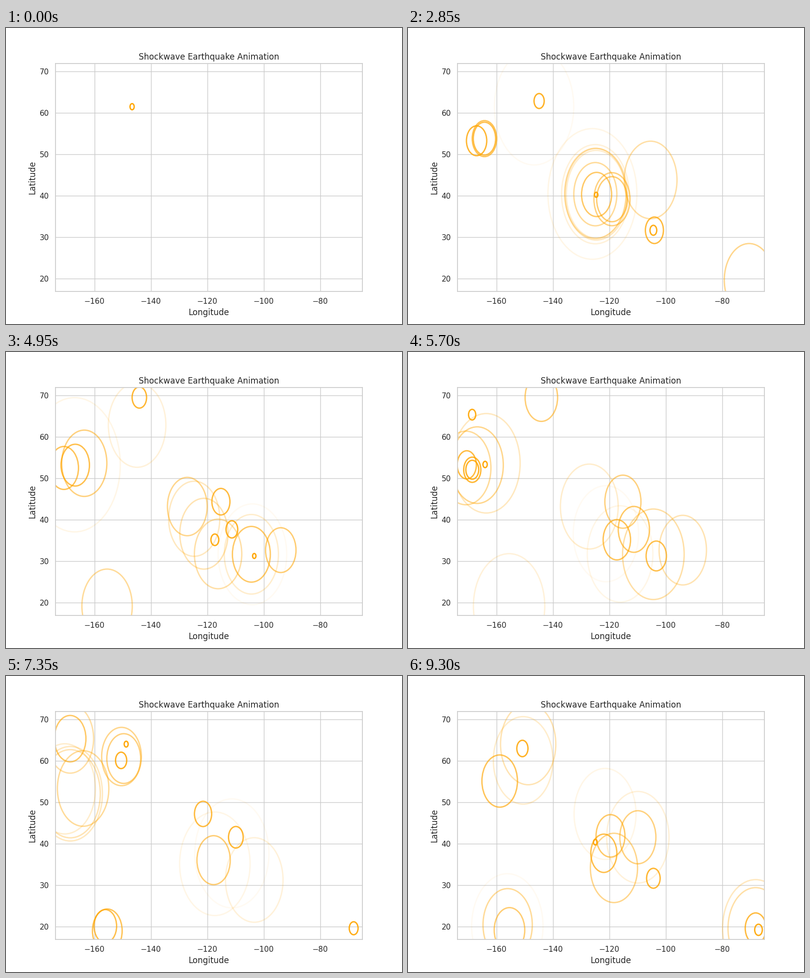
Write a matplotlib script that moves like this. It is 800 px wide and 600 px high and loops after 9.45 s.

```python
import matplotlib.pyplot as plt
from matplotlib.animation import FuncAnimation
from matplotlib.patches import Circle

LIFE = 20        # frames until a ring has faded out
SPEED = 0.2      # degrees per frame and unit of magnitude
INTERVAL = 150

# Epicentres as (longitude, latitude)
SITES = dict(
    # far north
    n1=(-146.66, 61.5), n2=(-144.88, 62.87), n3=(-144.09, 69.51),
    n4=(-168.63, 65.37), n5=(-150.41, 61.06), n6=(-149.62, 60.57),
    n7=(-150.55, 60.13), n8=(-148.76, 64.05), n9=(-150.81, 63.0),
    # island arc
    a1=(-164.26, 53.8), a2=(-167.05, 53.28), a3=(-163.61, 53.64),
    a4=(-170.85, 52.51), a5=(-166.82, 53.19), a6=(-170.53, 53.26),
    a7=(-168.58, 52.08), a8=(-164.03, 53.35), a9=(-158.86, 55.14),
    # west coast
    w1=(-125.98, 40.45), w2=(-124.95, 40.39), w3=(-124.64, 40.37),
    w4=(-124.92, 40.58), w5=(-121.2, 36.64), w6=(-127.09, 43.2),
    w7=(-121.5, 47.21), w8=(-121.94, 37.71), w9=(-124.5, 40.32),
    w10=(-124.64, 40.25),
    # inland
    i1=(-105.35, 43.82), i2=(-119.04, 39.18), i3=(-115.17, 44.37),
    i4=(-111.28, 37.69), i5=(-117.32, 35.18), i6=(-117.76, 36.05),
    i7=(-109.87, 41.58), i8=(-118.34, 34.18), i9=(-119.57, 41.91),
    # south
    s1=(-104.0, 31.68), s2=(-104.37, 31.68), s3=(-116.17, 31.76),
    s4=(-93.94, 32.68), s5=(-103.34, 31.27),
    # mid-ocean
    o1=(-155.53, 19.18), o2=(-155.45, 19.0), o3=(-156.15, 20.13),
    o4=(-156.04, 20.45), o5=(-155.39, 19.18),
    # south-east
    e1=(-70.42, 19.68), e2=(-68.1, 19.62), e3=(-67.09, 19.24),
)

# One quake starts per frame: (site, magnitude)
QUAKES = [
    ("n1", 3.7), ("n1", 3.7), ("w1", 4.38), ("w2", 3.52), ("w3", 3.31),
    ("w3", 3.68), ("w4", 3.89), ("i1", 3.6), ("w2", 3.18), ("e1", 4.0),
    ("i2", 3.2), ("i2", 3.02), ("w9", 3.33), ("a1", 3.1), ("a1", 3.3),
    ("s1", 3.2), ("a2", 4.5), ("n2", 3.0), ("s2", 3.0), ("w10", 3.02),
    ("w5", 3.05), ("s3", 3.23), ("o1", 3.72), ("w6", 3.2), ("a3", 4.0),
    ("s4", 3.0), ("s2", 4.2), ("a4", 3.7), ("a5", 4.2), ("i3", 3.2),
    ("n3", 3.2), ("i4", 3.46), ("i5", 3.47), ("s5", 3.0), ("a6", 3.4),
    ("a7", 3.8), ("a7", 3.8), ("n4", 3.2), ("a8", 3.8), ("n5", 3.2),
    ("n6", 3.0), ("i6", 3.28), ("n4", 3.5), ("o2", 3.76), ("o3", 3.33),
    ("w7", 3.05), ("i7", 3.25), ("n7", 3.3), ("e2", 3.91), ("n8", 3.5),
    ("e2", 3.77), ("o4", 3.64), ("i8", 3.8), ("i7", 3.2), ("o5", 3.01),
    ("i9", 3.2), ("a9", 4.5), ("w8", 3.85), ("e2", 3.7), ("s2", 3.0),
    ("n9", 3.3), ("e3", 3.38), ("w2", 3.3),
]

INK, LINE = "0.15", "0.8"
plt.rcParams.update({
    "font.family": "DejaVu Sans",
    "text.color": INK,
    "axes.labelcolor": INK,
    "axes.edgecolor": LINE,
    "axes.linewidth": 1.25,
    "axes.axisbelow": True,
    "axes.grid": True,
    "axes.titlesize": 12,
    "axes.labelsize": 12,
    "grid.color": LINE,
    "grid.linewidth": 1,
    "xtick.color": INK,
    "ytick.color": INK,
    "xtick.labelsize": 11,
    "ytick.labelsize": 11,
    "xtick.major.size": 6,
    "ytick.major.size": 6,
    "xtick.bottom": False,
    "ytick.left": False,
})

fig, ax = plt.subplots(figsize=(8, 6), dpi=100)
ax.set(xlim=(-173.82, -65), ylim=(16.92, 71.92),
       xticks=range(-160, -79, 20), yticks=range(20, 71, 10),
       xlabel="Longitude", ylabel="Latitude",
       title="Shockwave Earthquake Animation")

rings = [
    ax.add_patch(Circle(SITES[site], 0, fill=False, edgecolor="orange",
                        linewidth=2, visible=False))
    for site, _ in QUAKES
]


def update(frame):
    for start, (ring, (_, mag)) in enumerate(zip(rings, QUAKES)):
        age = frame - start + 1
        alive = 0 < age < LIFE
        ring.set_visible(alive)
        if alive:
            ring.set_radius(SPEED * mag * age)
            ring.set_alpha(1 - age / LIFE)
    return rings


anim = FuncAnimation(fig, update, frames=len(QUAKES), interval=INTERVAL,
                     repeat=True, repeat_delay=0, blit=False)
plt.show()
```
